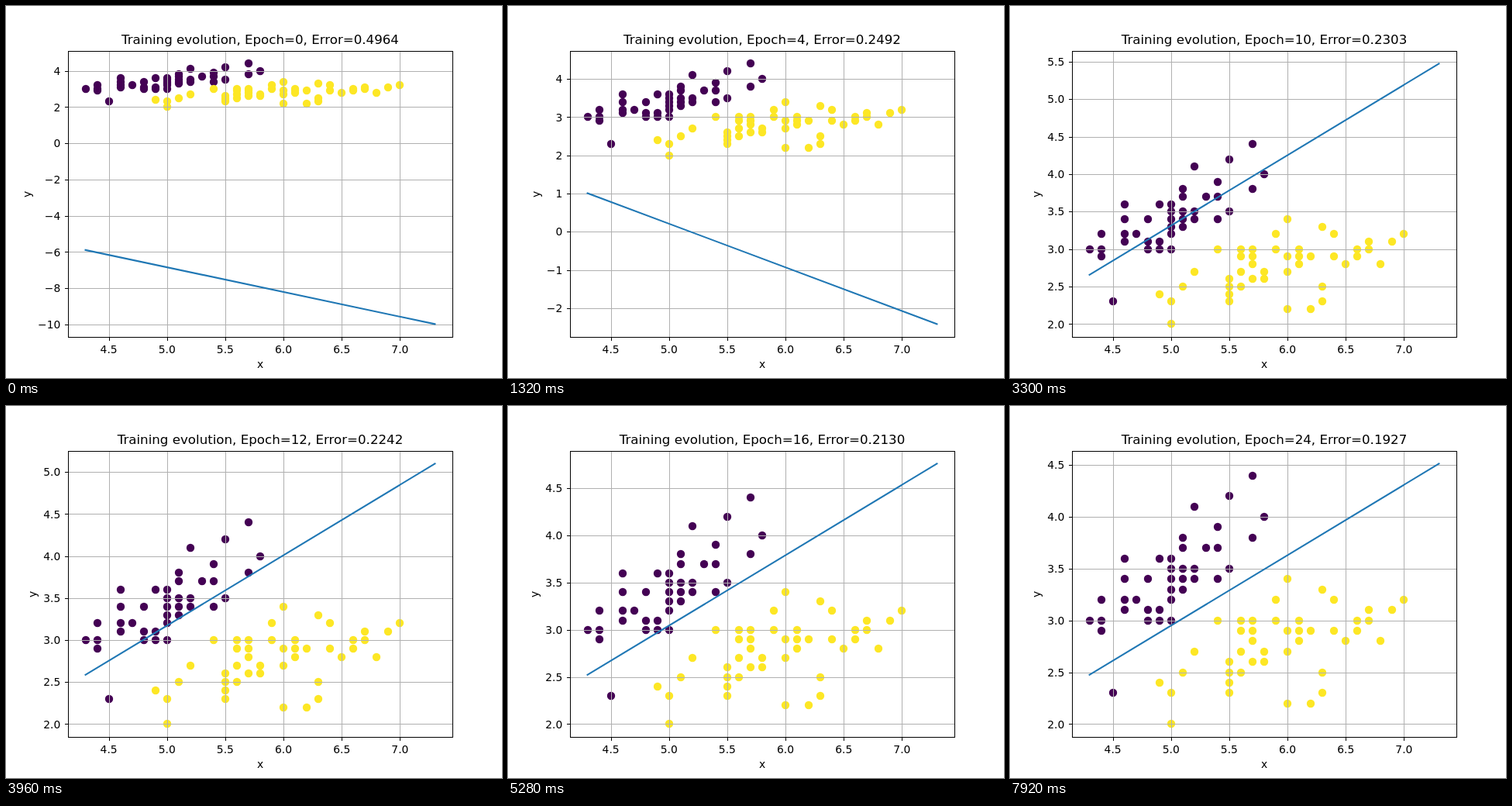
Recreate the animation shown at these times as an HTML page. Size 640 by 480 pixels, loop 8 s.

```html
<!DOCTYPE html>
<html lang="en">
<head>
<meta charset="utf-8">
<title>Training evolution</title>
<style>
  html, body { margin: 0; width: 100%; height: 100%; overflow: hidden; background: #fff; }
  svg { display: block; width: 640px; height: 480px; font: 13.889px "DejaVu Sans", sans-serif; }
  .title { font-size: 16.667px; }
  .mid { text-anchor: middle; }
  .end { text-anchor: end; }
  .grid { fill: #b0b0b0; }
  rect { shape-rendering: crispEdges; }
</style>
</head>
<body>
<svg id="chart" viewBox="0 0 640 480"></svg>
<script>
const EPOCH_MS = 330, LOOP_MS = 8000;
const LEFT = 80, RIGHT = 576, TOP = 57.6, BOTTOM = 427.2;
const MARGIN = 0.05;
const FONT = 13.889;

// Each row holds the y values (in tenths) of one x, x growing by 0.1 per row.
const parseRows = (startX, rows) => rows.split('|').flatMap((row, i) =>
  row.split(' ').filter(Boolean).map(y => [startX + i / 10, y / 10]));

const classes = [
  { color: '#440154', points: parseRows(4.3,
    '30|29 30 32|23|31 32 34 36|32|30 31 34|30 31 36|30 32 33 34 35 36|' +
    '33 34 35 37 38|34 35 41|37|34 37 39|35 42||38 44|40') },
  { color: '#fde725', points: parseRows(4.9,
    '24|20 23|25|27||30|23 24 25 26|25 27 29 30|26 28 29 30|26 27|30 32|' +
    '22 27 29 34|28 29 30|22 29|23 25 33|29 32|28|29 30|30 31|28|31|32') }
];

// Boundary heights at x = 4.3 and x = 7.3 before the line flips over.
const earlyLines = [
  [-5.89, -9.98], [-5.52, -9.54], [-3.86, -7.7],
  [-0.05, -3.615], [1.01, -2.415], [-37, -195]
];

const errorKnots = [
  [0, 0.4964], [1, 0.4857], [2, 0.4106], [3, 0.2637], [4, 0.2492],
  [7, 0.2395], [12, 0.2242], [16, 0.2130], [20, 0.2024], [24, 0.1927]
];

function boundary(epoch) {
  if (epoch < earlyLines.length) return earlyLines[epoch];
  const end = 4.175 + 6.43 / (epoch - 5.05);
  return [2 + 0.189 * (end - 2), end];
}

function errorAt(epoch) {
  const i = Math.max(1, errorKnots.findIndex(([e]) => e >= epoch));
  const [e0, v0] = errorKnots[i - 1], [e1, v1] = errorKnots[i];
  return v0 + (v1 - v0) * (epoch - e0) / (e1 - e0);
}

function tickStep(range) {
  const raw = range / 9;
  const unit = 10 ** Math.floor(Math.log10(raw));
  return unit * [1, 2, 2.5, 5, 10].find(s => s * unit >= raw);
}

function ticksBetween(lo, hi, step) {
  const ticks = [];
  for (let n = Math.ceil(lo / step); n * step <= hi; n++) ticks.push(n * step);
  return ticks;
}

const formatTick = (value, step) =>
  (value < 0 ? '\u2212' : '') + Math.abs(value).toFixed(step < 1 ? 1 : 0);

const labelWidth = label => FONT * [...label].reduce((sum, c) =>
  sum + (c === '.' ? 0.318 : c === '\u2212' ? 0.838 : 0.636), 0);

const snap = v => Math.floor(v + 0.5);
const rect = (x, y, w, h, cls = '') =>
  `<rect class="${cls}" x="${x}" y="${y}" width="${w}" height="${h}"/>`;
const text = (x, y, str, cls, extra = '') =>
  `<text class="${cls}" x="${x}" y="${y}" ${extra}>${str}</text>`;

const toX = x => LEFT + (x - 4.15) / 3.3 * (RIGHT - LEFT);

function render(epoch) {
  const line = boundary(epoch);
  const low = Math.min(2, ...line), high = Math.max(4.4, ...line);
  const pad = (high - low) * MARGIN;
  const lo = low - pad, hi = high + pad;
  const toY = y => BOTTOM - (y - lo) / (hi - lo) * (BOTTOM - TOP);

  let dots = '', grid = '', marks = '';
  for (const { color, points } of classes)
    for (const [x, y] of points)
      dots += `<circle cx="${snap(toX(x))}" cy="${snap(toY(y))}" r="5.2" fill="${color}"/>`;

  for (const x of ticksBetween(4.15, 7.45, 0.5)) {
    const px = snap(toX(x));
    grid += rect(px, 58, 1, 369, 'grid');
    marks += rect(px, 427, 1, 5) + text(toX(x), 448, x.toFixed(1), 'mid');
  }

  const step = tickStep(hi - lo);
  let widest = 0;
  for (const y of ticksBetween(lo, hi, step)) {
    const py = toY(y), label = formatTick(y, step);
    widest = Math.max(widest, labelWidth(label));
    grid += rect(80, snap(py), 496, 1, 'grid');
    marks += rect(76, snap(py), 5, 1) + text(70.3, Math.round(py + 5.1), label, 'end');
  }

  const frame = rect(80, 58, 1, 370) + rect(576, 58, 1, 370) +
    rect(80, 58, 497, 1) + rect(80, 427, 497, 1);
  const path = `<path d="M${toX(4.3)} ${toY(line[0])}L${toX(7.3)} ${toY(line[1])}"
    stroke="#1f77b4" stroke-width="2.083" stroke-linecap="square"/>`;
  const labelX = 70.3 - widest - 8.9;
  const labels = text(328, 467, 'x', 'mid') +
    text(0, 0, 'y', 'mid', `transform="translate(${labelX} 242.9) rotate(-90)"`) +
    text(328, 49, `Training evolution, Epoch=${epoch}, Error=${errorAt(epoch).toFixed(4)}`, 'mid title');

  chart.innerHTML = dots + grid + path + marks + frame + labels;
}

const chart = document.getElementById('chart');
let shown = -1;

function tick() {
  const epoch = Math.floor(performance.now() % LOOP_MS / EPOCH_MS);
  if (epoch !== shown) render(shown = epoch);
  requestAnimationFrame(tick);
}
tick();
</script>
</body>
</html>
```
